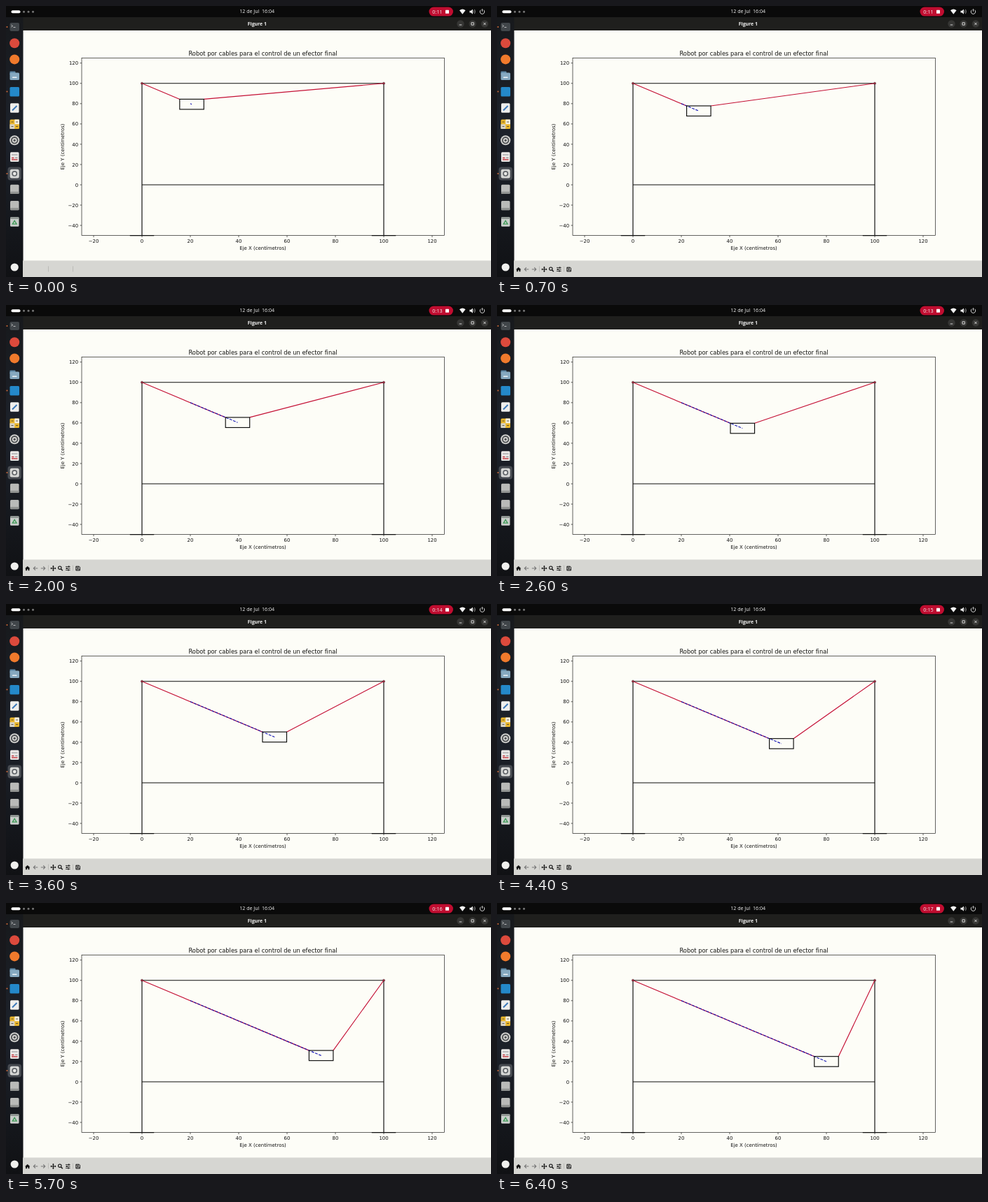
An HTML page for the animation above (6.9 s loop, 692 px wide and 388 px high).

```html
<!DOCTYPE html>
<html lang="es">
<head>
<meta charset="utf-8">
<title>Robot por cables</title>
<style>
  html, body { margin: 0; width: 100%; height: 100%; overflow: hidden; background: #fdfdf7; }
  svg { display: block; width: 692px; height: 388px; }
  .ui { font-family: "Open Sans", sans-serif; fill: #f2f2f2; text-anchor: middle; white-space: pre; }
  .plot { font: 6.95px "DejaVu Sans", sans-serif; fill: #111; text-anchor: middle; }
  .line { fill: none; stroke: #0c0c0c; stroke-width: 1.15; }
  .thin { fill: none; stroke: #111; stroke-width: .65; }
  .cable { fill: none; stroke: #c40f34; stroke-width: 1.15; }
  .trail { fill: none; stroke: #1414b4; stroke-width: 1.1; stroke-dasharray: 3.85 1.67; }
</style>
</head>
<body>
<svg viewBox="0 0 692 388">
  <defs>
    <linearGradient id="dockFill" x2="0" y2="1">
      <stop offset="0" stop-color="#17191c"/>
      <stop offset=".45" stop-color="#1d222b"/>
      <stop offset="1" stop-color="#101114"/>
    </linearGradient>
  </defs>
  <rect width="692" height="388" fill="#fdfdf7"/>

  <!-- top bar -->
  <rect width="692" height="16.5" fill="#0a0a0a"/>
  <rect x="7.5" y="6.2" width="13" height="4" rx="2" fill="#fff"/>
  <g fill="#777"><circle cx="25.5" cy="8.2" r="1.5"/><circle cx="32" cy="8.2" r="1.5"/><circle cx="38.5" cy="8.2" r="1.5"/></g>
  <text class="ui" x="358.2" y="10.4" font-size="7.1">12 de Jul  16:04</text>
  <rect x="603.5" y="1.6" width="34.5" height="13" rx="6.5" fill="#c00d30"/>
  <text class="ui" id="clock" x="615.5" y="10.8" font-size="7.3"></text>
  <rect x="627" y="5.8" width="5" height="5" rx=".6" fill="#fff"/>
  <path d="M647 6.2Q651.3 2.8 655.6 6.2L651.3 11.8Z" fill="#f4f4f4"/>
  <path d="M661.5 6.8h2l2.4-2.4v7.4l-2.4-2.4h-2z" fill="#f4f4f4"/>
  <path d="M667 6.2q1.4 1.8 0 3.6M668.4 4.8q2.4 3.2 0 6.4" fill="none" stroke="#999" stroke-width=".8"/>
  <path d="M677.7 5.6a3.2 3.2 0 1 0 3.6 0M679.5 4.2v3.6" fill="none" stroke="#f4f4f4" stroke-width=".9"/>

  <!-- title bar -->
  <rect x="24" y="16" width="668" height="19" fill="#1f1f1d"/>
  <text class="ui" x="358.3" y="28" font-size="6.9" font-weight="700">Figure 1</text>
  <g fill="#363634"><circle cx="648.5" cy="25.5" r="5.2"/><circle cx="665.7" cy="25.5" r="5.2"/><circle cx="683" cy="25.5" r="5.2"/></g>
  <path d="M646.7 27h3.6M664 23.8h3.4v3.4h-3.4zM681.3 23.8l3.4 3.4m0-3.4l-3.4 3.4" fill="none" stroke="#eee" stroke-width=".85"/>

  <!-- dock -->
  <rect y="16" width="24.5" height="372" fill="url(#dockFill)"/>
  <rect x="2.5" y="230.5" width="19.5" height="19" rx="4" fill="#464a50"/>
  <g fill="#e2703a"><circle cx="1.5" cy="30" r=".9"/><circle cx="1.5" cy="122.5" r=".9"/><circle cx="1.5" cy="240" r=".9"/></g>
  <g id="dock"></g>

  <!-- chart -->
  <g id="chart"></g>
  <path class="cable" id="cables"/>
  <path class="trail" id="trail"/>
  <rect class="line" id="effector"/>
  <g id="pulleys" fill="#a02038" stroke="#5a4046" stroke-width=".6"></g>

  <!-- toolbar -->
  <rect x="24" y="364.5" width="668" height="23.5" fill="#d6d6d2"/>
  <path d="M60.5 372.5v8M95.5 372.5v8" stroke="#b4b4b0" stroke-width=".8"/>
  <g id="tools" fill="none" stroke="#111" stroke-width="1.1">
    <path d="M27 377.2l3.7-3.3 3.7 3.3h-1v3h-1.9v-2h-1.6v2h-1.9v-3z" fill="#111" stroke="none"/>
    <path d="M45.3 377h-6m2.6-2.6l-2.6 2.6 2.6 2.6M49.8 377h6m-2.6-2.6l2.6 2.6-2.6 2.6" stroke="#777"/>
    <path d="M64 377h6.8M67.4 373.6v6.8"/>
    <path d="M67.4 372.9l1.5 1.7h-3zM67.4 381.1l1.5-1.7h-3zM63.3 377l1.7-1.5v3zM71.5 377l-1.7-1.5v3z" fill="#111" stroke="none"/>
    <circle cx="76.8" cy="376.2" r="2.2"/><path d="M78.4 377.9l2.4 2.4" stroke-width="1.4"/>
    <path d="M85 374.5h6.6M85 377h6.6M85 379.5h6.6" stroke-width=".8"/>
    <path d="M89.6 373.5v2M86.8 376v2M89 378.5v2" stroke-width="1.4"/>
    <path d="M99.8 374.2h4.6l1.1 1.1v4.7h-5.7zM101 374.4v1.7h2.7v-1.7M101.2 380v-2.2h2.8v2.2" stroke-width=".9"/>
  </g>
</svg>
<script>
const SVG = "http://www.w3.org/2000/svg";
const $ = id => document.getElementById(id);

function add(parent, tag, attrs, text) {
  const el = document.createElementNS(SVG, tag);
  for (const k in attrs) el.setAttribute(k, attrs[k]);
  if (text) el.textContent = text;
  parent.appendChild(el);
  return el;
}

// Data units to pixels
const px = x => 194 + 3.45 * x;
const py = y => 256 - 1.4525 * y;
const pt = (x, y) => px(x).toFixed(2) + " " + py(y).toFixed(2);

function buildChart() {
  const g = $("chart");
  const label = (x, y, text, extra) => add(g, "text", { class: "plot", x, y, ...extra }, text);
  const minus = v => String(v).replace("-", "\u2212");

  add(g, "rect", { class: "thin", x: 108, y: 74.4, width: 517.4, height: 254.2 });
  for (let v = -20; v <= 120; v += 20) {
    add(g, "path", { class: "thin", d: `M${px(v)} 328.6v2.5` });
    label(px(v), 339.2, minus(v));
  }
  for (let v = -40; v <= 120; v += 20) {
    add(g, "path", { class: "thin", d: `M108 ${py(v)}h-2.5` });
    label(103.2, py(v) + 2.6, minus(v), { style: "text-anchor:end" });
  }
  label(366.5, 70.6, "Robot por cables para el control de un efector final", { style: "font-size:8.34px" });
  label(366.5, 349.2, "Eje X (centímetros)");
  label(0, 0, "Eje Y (centímetros)", { transform: "translate(83.4 201.5) rotate(-90)" });

  add(g, "path", { class: "line", d:
    `M${pt(0, -50)}L${pt(0, 100)}L${pt(100, 100)}L${pt(100, -50)}` +
    `M${pt(0, 0)}L${pt(100, 0)}M${pt(-5, -50)}L${pt(5, -50)}M${pt(95, -50)}L${pt(105, -50)}` });
  for (const x of [0, 100]) add($("pulleys"), "circle", { cx: px(x), cy: py(100), r: 1.6 });
}

function buildDock() {
  const g = $("dock");
  const box = (x, y, w, h, fill, rx = 1) => add(g, "rect", { x, y, width: w, height: h, fill, rx });
  const dot = (y, r, fill) => add(g, "circle", { cx: 12.2, cy: y, r, fill });
  const stroke = (d, color, width = 1) => add(g, "path", { d, fill: "none", stroke: color, "stroke-width": width });

  box(5.5, 24, 13.5, 12, "#41464a", 2);
  stroke("M7.5 27l2 1.6-2 1.6M10.5 30.5h3", "#ddd", .8);
  dot(53.2, 7, "#dc4a3c");
  dot(76.4, 7, "#f07a2c");
  box(5.5, 93.5, 8, 5, "#5d87a5");
  box(5.5, 95.5, 13.5, 10.5, "#86a9c0", 1.5);
  box(9, 101.5, 6.5, 1.5, "#eef3f6", .5);
  box(5.5, 116, 13.5, 13.5, "#2489ca", 1.5);
  box(6, 139.3, 12.5, 13.4, "#eeeeec", 1.5);
  stroke("M9 149.5l6.5-6.5", "#3b78b8", 2);
  box(5.5, 162.5, 13.5, 13.5, "#e9b62c", 1.5);
  box(12.3, 162.5, 6.7, 6.7, "#f5efe0", .5);
  box(5.5, 169.3, 6.7, 6.7, "#d8d4c8", .5);
  stroke("M7.5 166h3M14 166h3.2M7.5 172.5h3M14 172.5h3.2", "#40382a", .8);
  dot(192.3, 7, "#d5d5d2");
  dot(192.3, 5.2, "#4c4f52");
  dot(192.3, 3.4, "#d5d5d2");
  dot(192.3, 1.6, "#4c4f52");
  box(6, 209.3, 12.5, 13.6, "#ebe9e7", 1.5);
  stroke("M8 217.5h3.5M8 220h8.5", "#c43c44", 1.6);
  stroke("M8 213h8.5M13 217.3h3.5", "#8b8d92", 1.2);
  box(5.7, 233.8, 13, 12.6, "#d7d8d6", 2.5);
  dot(240.1, 4, "#63676b");
  dot(240.1, 2.3, "#e8e8e6");
  for (const y of [262.4, 285.6]) {
    box(6, y - 6.6, 12.5, 13.2, "#b9bab8", 1.5);
    box(6, y + 3.4, 12.5, 3.2, "#929492", 1);
  }
  box(6, 302.3, 12.5, 13.4, "#c9cdca", 1.5);
  box(6, 302.3, 12.5, 2.6, "#8f9592", 1);
  stroke("M12.2 307.3l2.9 4.8H9.3z", "#3d9a56", 1.3);
  dot(374, 5.6, "#f0f0ee");
}

// Effector x at times in seconds; y is 100 - x
const keys = [[0, 20.6], [1.4, 33.8], [2.6, 45.3], [3.6, 54.85], [4.4, 61.4], [5.7, 74.1], [6.4, 80]];
function effectorX(s) {
  for (let i = 1; i < keys.length; i++) {
    const [t0, x0] = keys[i - 1], [t1, x1] = keys[i];
    if (s <= t1) return x0 + (x1 - x0) * (s - t0) / (t1 - t0);
  }
  return 80;
}

const LOOP = 6900, STEP = 100;

function draw(ms) {
  const s = Math.floor((ms % LOOP) / STEP) * STEP / 1000;
  const x = effectorX(s), y = 100 - x;
  $("cables").setAttribute("d",
    `M${pt(0, 100)}L${pt(x - 5, y + 5)}M${pt(100, 100)}L${pt(x + 5, y + 5)}`);
  $("trail").setAttribute("d", `M${pt(20, 80)}L${pt(x, y)}`);
  const box = { x: px(x - 5), y: py(y + 5), width: 34.5, height: 14.525 };
  for (const k in box) $("effector").setAttribute(k, box[k]);
  $("clock").textContent = "0:" + (11 + Math.floor(s));
  $("tools").style.display = s > 0 ? "" : "none";
}

buildChart();
buildDock();
const start = performance.now();
function tick() {
  draw(performance.now() - start);
  requestAnimationFrame(tick);
}
tick();
</script>
</body>
</html>
```
